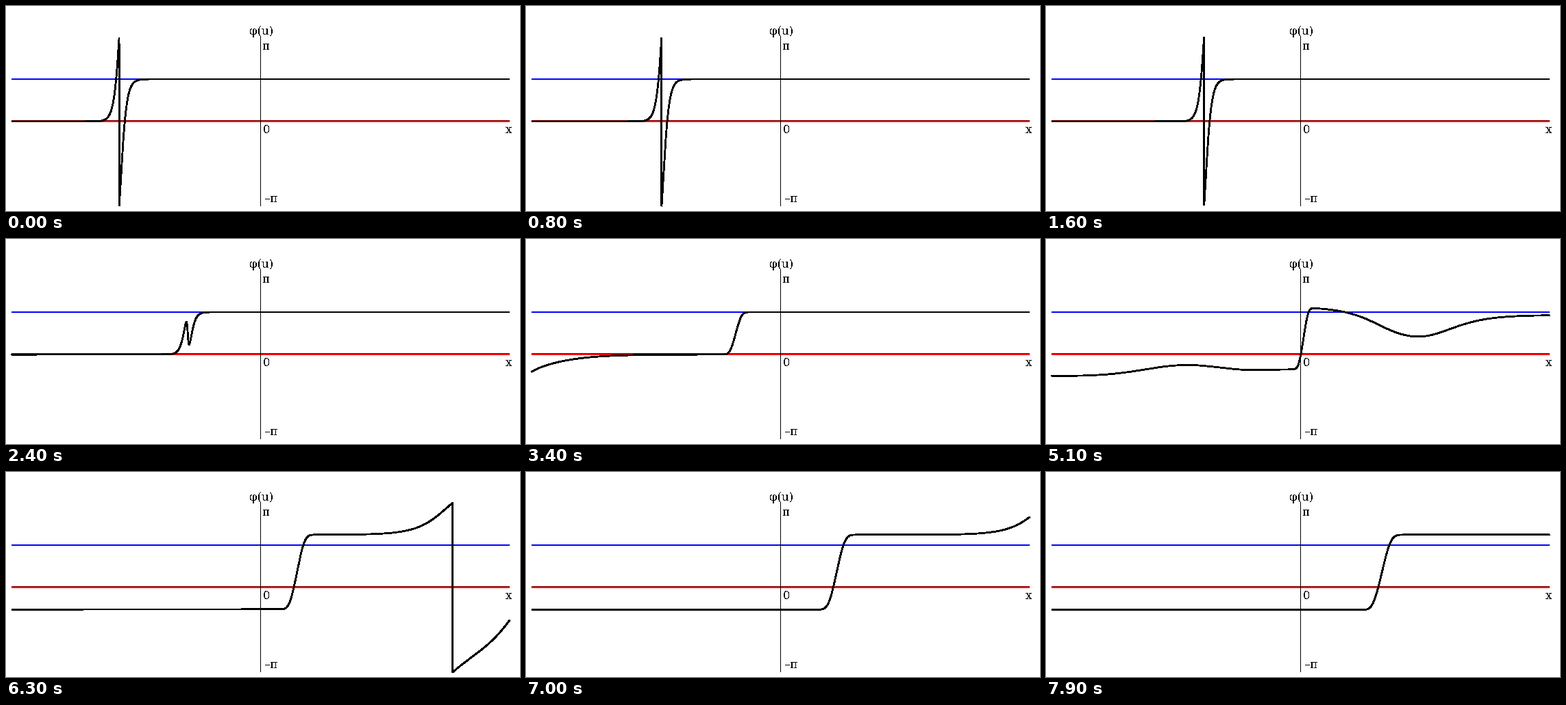
These frames come from a looping animation (750x300 px, 8 s). A matplotlib script:

```python
import numpy as np
import matplotlib
import matplotlib.pyplot as plt
from matplotlib.animation import FuncAnimation
from matplotlib.patches import Rectangle

matplotlib.rcParams["text.antialiased"] = False

W, H, DPI = 750, 300, 100
FRAMES, STEP = 80, 100
X0, X1, MID, ZERO, HALF = 8, 735, 371, 169, 124   # HALF: pixels per pi
x = np.linspace(X0, X1, 7271)


def sigmoid(z):
    return 0.5 * (1 + np.tanh(z / 2))


def smooth(z):
    z = np.clip(z, 0, 1)
    return z * z * (3 - 2 * z)


def turn(u, d):
    """Half turn past a zero at distance d; the sign of d picks its sense."""
    return np.arctan2(d, -np.sinh(np.clip(u, -20, 20))) / np.pi


def left_state(t):
    speed = 20.5 if t < 42 else 12
    s = x - 132 - speed * (t - 42)
    wave = -0.208 * np.logaddexp(0, (54 - s) / 40) + turn(-s / 10, 0.32 * (t - 40))
    c = smooth((t - 42) / 9)
    if c == 0:
        return wave
    drift = 11 * (t - 51)
    fade = min(1, np.exp((51 - t) / 3))
    rest = np.interp(t, [51, 79], [-0.255, -0.265])
    hump = 0.13 * np.exp(-((x - 205 - drift) / 85) ** 2)
    shelf = 0.08 * sigmoid((x - 305 - drift) / 22)
    return (1 - c) * wave + c * (rest + fade * (hump + shelf))


def right_state(t):
    s = x - 515 - 15.4 * (t - 51)
    plateau = np.interp(t, [40, 51, 56, 63], [0.5, 0.565, 0.61, 0.622])
    amp = np.clip((t - 36) / 15, 0, 1) ** 2.2
    d = np.interp(t, [42, 51, 54, 56.5, 63], [-1.5, -1.3, -0.8, 0.02, 4.8])
    w = np.interp(t, [51, 63], [35, 27])
    return plateau + amp * (0.9 * sigmoid((s - 45) / 33) + turn(s / w, d))


def phase(t):
    """Phase along x in units of pi, wrapped to one turn."""
    s = x - 167 - 4.09 * t
    u = s / np.interp(t, [42, 51, 63, 79], [8.5, 7, 11, 13])
    k = 0.5 * (1 + np.tanh(u + 0.15 * u ** 3))
    d = 1 - 0.1575 * max(t - 16, 0)
    twisted = 0.75 * (1 + np.tanh(s / 9)) + turn(s / 5.7, d)
    b = smooth((t - 27) / 6)
    front = (1 - b) * twisted + b * 0.5 * k
    p = front + left_state(t) * (1 - k) + (right_state(t) - 0.5) * k
    return (p + 1) % 2 - 1


fig = plt.figure(figsize=(W / DPI, H / DPI), dpi=DPI, facecolor="white")
ax = fig.add_axes([0, 0, 1, 1])
ax.set_xlim(0, W)
ax.set_ylim(H, 0)
ax.axis("off")


def bar(left, top, w, h, color):
    ax.add_patch(Rectangle((left, top), w, h, fc=color, lw=0, antialiased=False))


def label(left, base, text):
    ax.text(left, base, text, family="DejaVu Serif", size=16.5 * 72 / DPI,
            ha="left", va="baseline")


bar(X0, ZERO - 2, X1 - X0, 1, "#800000")
bar(X0, ZERO - 1, X1 - X0, 2, "#ff0000")
bar(X0, ZERO - HALF // 2 - 1, X1 - X0, 2, "#0000ff")
bar(MID, 44, 1, 249, "black")
label(355, 42, "φ(u)")
label(374, 64, "π")
label(375, 186, "0")
label(729, 186, "x")
label(377, 287, "–π")

curve, = ax.plot([], [], color="black", lw=1.8 * 72 / DPI, antialiased=False,
                 snap=False, solid_capstyle="butt", solid_joinstyle="bevel")


def draw(i):
    curve.set_data(x, ZERO - HALF * phase(i))
    return curve,


anim = FuncAnimation(fig, draw, frames=FRAMES, interval=STEP,
                     repeat=True, repeat_delay=0, blit=False)
plt.show()
```
